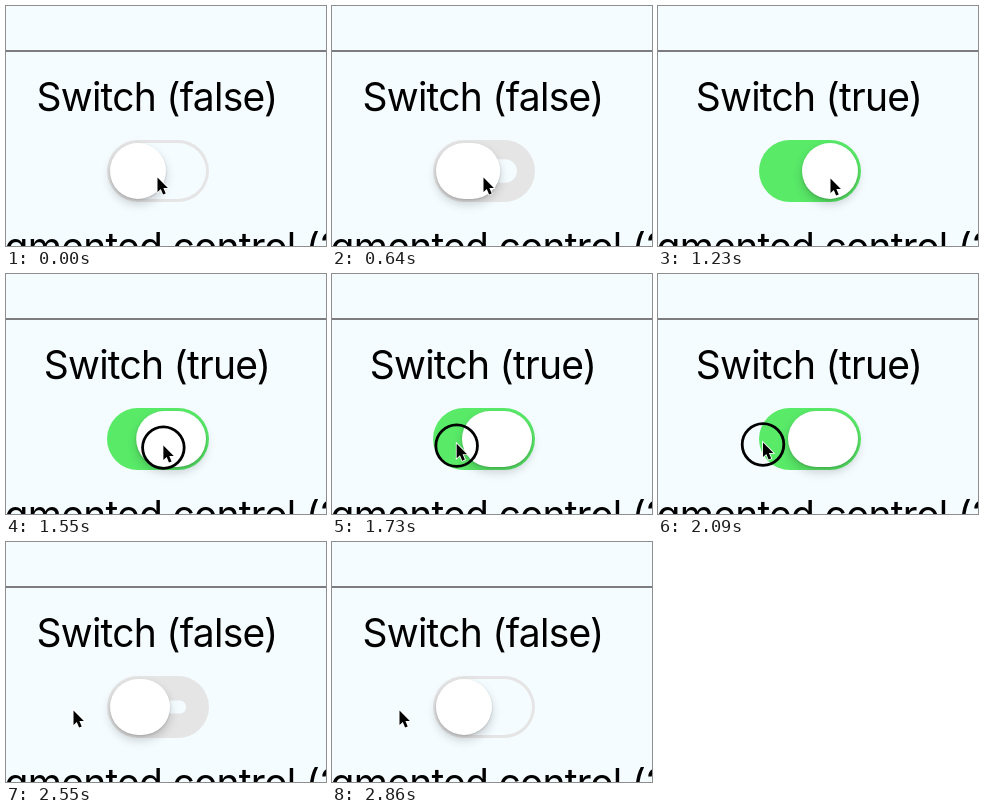
Recreate the animation shown at these times as an HTML page. Size 320 by 240 pixels, loop 3630 ms.

```html
<!DOCTYPE html>
<html lang="en">
<head>
<meta charset="utf-8">
<title>Switch</title>
<style>
  html, body { margin: 0; width: 100%; height: 100%; overflow: hidden; background: #f5fcff; }
  svg { display: block; width: 100%; height: 100%; }
  text { font: 39px Inter, "Liberation Sans", sans-serif; letter-spacing: -.75px; text-anchor: middle; }
  #knob { fill: #fff; filter: drop-shadow(0 1px 1px rgba(0,0,0,.16)) drop-shadow(0 5px 5px rgba(0,0,0,.18)); }
</style>
</head>
<body>
<svg viewBox="0 0 320 240">
  <rect width="320" height="240" fill="#f5fcff"/>
  <rect y="44" width="320" height="2" fill="#7d7d80"/>
  <text id="label" x="151" y="105"></text>
  <text x="151" y="255">Segmented control (2)</text>
  <rect id="track" x="101" y="134" width="102" height="62" rx="31"/>
  <rect id="hole" x="104" y="137" width="96" height="56" rx="28" fill="#f5fcff"/>
  <rect id="knob" y="137" height="56" rx="28"/>
  <g id="pointer">
    <circle id="ring" cy="2" r="20.8" fill="none" stroke="#000" stroke-width="2.8"/>
    <path d="M0 0V14.5L3.3 11.5L5.6 17L8.2 15.9L5.9 10.5H10.4Z" stroke="#fff" stroke-width="1.6" paint-order="stroke"/>
  </g>
</svg>
<script>
const LOOP = 3630, FPS = 22;
const TAP = 470, TURN_ON = 730, PRESS = 1330, TURN_OFF = 2110, RELEASE = 2410;
const [label, track, hole, knob, pointer, ring] =
  ['label', 'track', 'hole', 'knob', 'pointer', 'ring'].map(id => document.getElementById(id));

// Eased 0 to 1 over the given span of time.
function ramp(t, start, duration) {
  const k = Math.min(1, Math.max(0, (t - start) / duration));
  return k * k * (3 - 2 * k);
}

function drawSwitch(t) {
  const touch = ramp(t, TAP, 300);
  const turnOn = ramp(t, TURN_ON, 300);

  const green = turnOn - ramp(t, TURN_OFF, 230);
  track.setAttribute('fill', `color-mix(in srgb, #59ea68 ${green * 100}%, #e5e5e6)`);

  const open = 1 - touch + ramp(t, RELEASE, 430);
  hole.setAttribute('transform', `translate(174 165) scale(${open}) translate(-174 -165)`);

  const stretch = touch - turnOn + ramp(t, PRESS, 230) - ramp(t, RELEASE, 210);
  const slide = turnOn - ramp(t, TURN_OFF, 290);
  const width = 56 + 14 * stretch;
  knob.setAttribute('width', width);
  knob.setAttribute('x', 104 + slide * (96 - width));
}

function drawPointer(t) {
  const approach = ramp(t, 1000, 200);
  const drag = ramp(t, PRESS + 50, 540);
  const flick = ramp(t, TURN_OFF - 20, 260);
  const x = 151.5 + 21 * approach - 67.5 * drag - 37.5 * flick;
  const y = 171.5 + approach - 4 * drag;
  pointer.setAttribute('transform', `translate(${x} ${y})`);
  ring.setAttribute('visibility', t >= PRESS && t < RELEASE ? 'visible' : 'hidden');
}

function draw(t) {
  label.textContent = `Switch (${t >= TURN_ON && t < RELEASE})`;
  drawSwitch(t);
  drawPointer(t);
}

const start = performance.now();
function tick() {
  const t = (performance.now() - start) % LOOP;
  // Hold each pose for one step of the frame rate.
  draw(Math.floor((t + 4.9) * FPS / 1000) * 1000 / FPS);
  requestAnimationFrame(tick);
}
draw(0);
requestAnimationFrame(tick);
</script>
</body>
</html>
```
